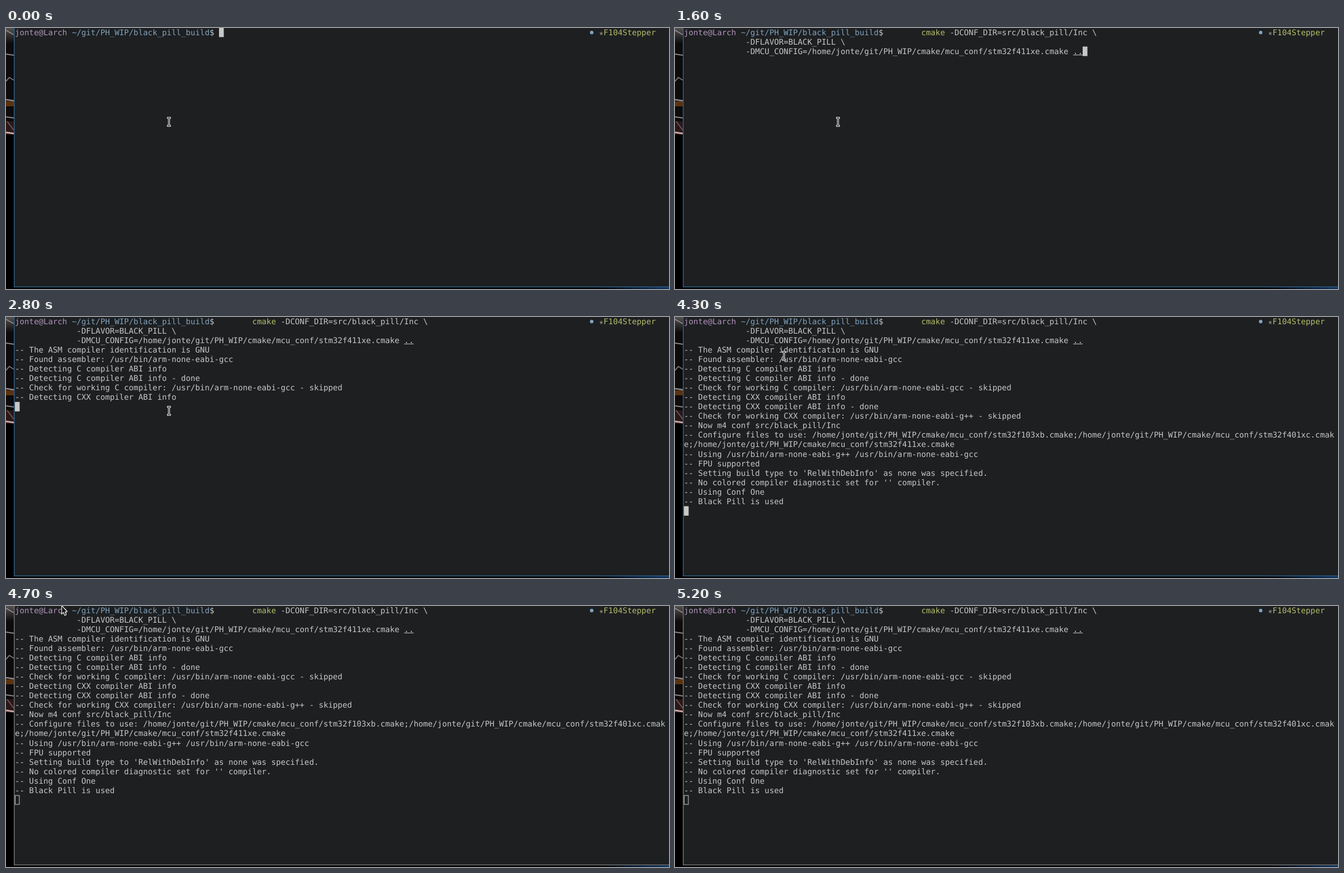
Write an HTML page with a canvas that moves like this. It is 1192 px wide and 470 px high and loops after 5400 ms.

```html
<!DOCTYPE html>
<html lang="en">
<head>
<meta charset="utf-8">
<title>Terminal build</title>
<style>
html, body { margin: 0; width: 100%; height: 100%; overflow: hidden; background: #000; }
canvas { display: block; }
</style>
</head>
<body>
<canvas id="stage" width="1192" height="470"></canvas>
<script>
const ctx = document.getElementById('stage').getContext('2d');
const LOOP = 5400;
const BG = '#1d1f21', FG = '#c5c8c6', PURPLE = '#b294bb', BLUE = '#81a2be', GREEN = '#b5bd68';

// Terminal cells are 10 x 20 units, scaled down to the stage.
const SCALE = 0.8535, LEFT = 16, TOP = -0.7, CELL_W = 10, CELL_H = 20, BASE = 15.5;

const CONF = '/home/jonte/git/PH_WIP/cmake/mcu_conf/';
const COMMAND = [
  [50, 'cmake -DCONF_DIR=src/black_pill/Inc \\'],
  [13, '-DFLAVOR=BLACK_PILL \\'],
  [13, `-DMCU_CONFIG=${CONF}stm32f411xe.cmake ..`]
];
const OUTPUT = [
  '-- The ASM compiler identification is GNU',
  '-- Found assembler: /usr/bin/arm-none-eabi-gcc',
  '-- Detecting C compiler ABI info',
  '-- Detecting C compiler ABI info - done',
  '-- Check for working C compiler: /usr/bin/arm-none-eabi-gcc - skipped',
  '-- Detecting CXX compiler ABI info',
  '-- Detecting CXX compiler ABI info - done',
  '-- Check for working CXX compiler: /usr/bin/arm-none-eabi-g++ - skipped',
  '-- Now m4 conf src/black_pill/Inc',
  `-- Configure files to use: ${CONF}stm32f103xb.cmake;${CONF}stm32f401xc.cmak`,
  `e;${CONF}stm32f411xe.cmake`,
  '-- Using /usr/bin/arm-none-eabi-g++ /usr/bin/arm-none-eabi-gcc',
  '-- FPU supported',
  "-- Setting build type to 'RelWithDebInfo' as none was specified.",
  "-- No colored compiler diagnostic set for '' compiler.",
  '-- Using Conf One',
  '-- Black Pill is used'
];

// Pointer visits late in the loop: start time, shape, x, y, window focused.
const POINTER = [
  [0, 'beam', 293, 169, true],
  [4300, 'beam', 196, 70, true],
  [4400, '', 0, 0, false],
  [4700, 'arrow', 100, 0, false],
  [4800, 'beam', 92, 32, true],
  [4900, 'beam', 86, 44, true],
  [5000, 'beam', 82, 36, true],
  [5100, 'arrow', 80, 0, false],
  [5200, '', 0, 0, false]
];

function rect(color, x, y, w, h) {
  ctx.fillStyle = color;
  ctx.fillRect(x, y, w, h);
}

function line(color, width, points, fill) {
  ctx.beginPath();
  points.forEach(([x, y]) => ctx.lineTo(x, y));
  if (fill) {
    ctx.closePath();
    ctx.fillStyle = fill;
    ctx.fill();
  }
  ctx.strokeStyle = color;
  ctx.lineWidth = width;
  ctx.stroke();
}

function text(str, col, row, color = FG) {
  ctx.fillStyle = color;
  ctx.fillText(str, col * CELL_W, row * CELL_H + BASE);
}

function cells(col, row, count, rise = 0) {
  rect(FG, col * CELL_W, row * CELL_H - rise, count * CELL_W, CELL_H + rise);
}

function cursor(col, row, focused) {
  if (focused) return cells(col, row, 1);
  ctx.strokeStyle = FG;
  ctx.lineWidth = 1.2;
  ctx.strokeRect(col * CELL_W + 0.6, row * CELL_H + 0.6, CELL_W - 1.2, CELL_H - 1.2);
}

function desktop() {
  rect('#000', 0, 0, 1192, 470);
  rect('#0d0b0c', 0, 0, 14, 192);
  const top = ctx.createLinearGradient(0, 0, 0, 28);
  top.addColorStop(0, '#55504f');
  top.addColorStop(1, '#0d0b0c');
  rect(top, 0, 0, 14, 28);
  rect('#5a3310', 0, 132, 14, 9);
  rect('#2a1718', 0, 168, 14, 24);
  line('#8d8688', 2, [[0, 4], [14, 12]]);
  line('#8d8688', 2, [[0, 47], [14, 49]]);
  line('#777073', 2, [[0, 96], [6, 89], [14, 94]]);
  line('#918a90', 2.5, [[0, 129], [14, 131]]);
  line('#8d8688', 2, [[0, 160], [14, 162]]);
  line('#6d5558', 2, [[2, 168], [14, 184]]);
  line('#c9a5a3', 3, [[0, 188], [14, 190]]);
  const glow = ctx.createLinearGradient(1060, 0, 1192, 0);
  glow.addColorStop(0, '#000');
  glow.addColorStop(1, '#0d3566');
  rect(glow, 1060, 467, 132, 3);
}

function terminalText(t, focused) {
  text('jonte@Larch', 0, 0, PURPLE);
  text('~/git/PH_WIP/black_pill_build', 12, 0, BLUE);
  text('$', 41, 0);
  text('F104Stepper', 124, 0, GREEN);
  ctx.beginPath();
  ctx.arc(121.5 * CELL_W, 10.4, 3.7, 0, 7);
  ctx.fillStyle = BLUE;
  ctx.fill();
  ctx.save();
  ctx.font = '11px "DejaVu Sans", sans-serif';
  ctx.textAlign = 'center';
  text('✭', 123.5, 0, '#b5b8a0');
  ctx.restore();

  if (t < 700) return cursor(43, 0, true);

  const pasted = t < 1600;
  if (pasted) {
    cells(43, 0, 44);
    cells(0, 1, 34, 1);
    cells(0, 2, 85);
  }
  COMMAND.forEach(([col, str], row) => text(str, col, row, pasted ? BG : FG));
  if (pasted) return;

  rect(BG, 500, 1, 50, 18);
  text('cmake', 50, 0, GREEN);
  rect(FG, 820, 2 * CELL_H + BASE + 1.6, 20, 1.2);
  if (t < 2800) return cursor(84, 2, true);

  const shown = OUTPUT.slice(0, t < 2900 ? 6 : OUTPUT.length);
  shown.forEach((str, i) => text(str, 0, i + 3));
  cursor(0, shown.length + 3, focused);
}

function pointer(shape, x, y) {
  ctx.save();
  ctx.translate(x, y);
  if (shape === 'beam') {
    for (const [color, width, end] of [['#f4f4f4', 3.2, 3.3], ['#111', 1.1, 2.2]]) {
      line(color, width, [[-end, -7.2], [end, -7.2]]);
      line(color, width, [[0, -7.2], [0, 7.2]]);
      line(color, width, [[-end, 7.2], [end, 7.2]]);
    }
  } else if (shape === 'arrow') {
    const outline = [[0, -1], [0, 14.5], [3.4, 11.8], [5.6, 17], [8.4, 15.8], [6.4, 10.8], [10, 10], [0, -1], [0, 3]];
    line('#f4f4f4', 1.2, outline, '#1b1b1b');
  }
  ctx.restore();
}

function draw(t) {
  const [, shape, x, y, focused] = POINTER.findLast(p => p[0] <= t);
  desktop();
  rect(focused ? '#2f5d80' : '#6e6e6e', 14, 0, 1178, 467);
  rect(BG, 15.6, 0, 1176.4, 465.5);

  ctx.save();
  ctx.translate(LEFT, TOP);
  ctx.scale(SCALE, SCALE);
  ctx.font = '16.61px "DejaVu Sans Mono", monospace';
  ctx.textRendering = 'geometricPrecision';
  terminalText(t, focused);
  ctx.restore();

  pointer(shape, x, y);
}

const start = performance.now();
function tick() {
  draw((performance.now() - start) % LOOP);
  requestAnimationFrame(tick);
}
tick();
</script>
</body>
</html>
```
